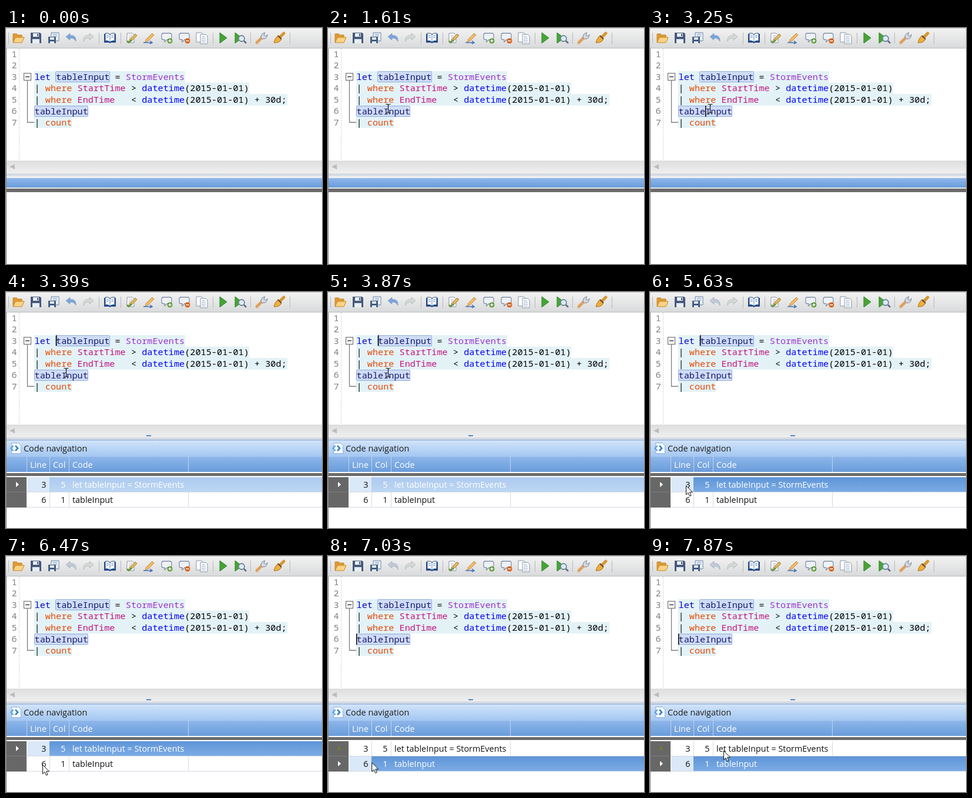
Write an HTML page that moves like this. It is 538 px wide and 404 px high and loops after 8 s.

```html
<!DOCTYPE html>
<html lang="en">
<head>
<meta charset="utf-8">
<title>Code navigation</title>
<style>
html, body { margin: 0; width: 100%; height: 100%; overflow: hidden; background: #fff; }
svg { display: block; width: 538px; height: 404px; }
.code text { font: 15.23px "Noto Sans Mono", monospace; white-space: pre; }
.num { fill: #808080; }
.kw { fill: #0000d0; } .fn { fill: #0000ff; } .id { fill: #191970; }
.op { fill: #e64a0c; } .col { fill: #c4157f; } .tbl { fill: #9a32cd; }
.ui text { font: 14.4px "Open Sans", "Noto Sans", sans-serif; }
.end { text-anchor: end; }
.white { fill: #fff; }

/* 1% of the loop is 80 ms */
.a { animation: 8s step-end infinite; }
.idle { animation-name: idle; }
.results { animation-name: results; }
.caret { fill: #000; }
.caret-a { animation-name: caret-a; }
.caret-b { animation-name: caret-b; }
.caret-c { animation-name: caret-c; }
.undo { animation-name: undo; }
.hover { animation-name: hover; }
.plain { animation-name: plain; }
.focus { animation-name: focus; }
.first { animation-name: first; }
.second { animation-name: second; }
.text1 { animation-name: text1; }
.text2 { animation-name: text2; }
.mark1 { animation-name: mark1; }
.pointer { animation: move 8s linear infinite, enter 8s step-end infinite; }
.arrow { animation-name: arrow; }
.beam { animation-name: beam; }

@keyframes idle { 0% { opacity: 1 } 42.375%, to { opacity: 0 } }
@keyframes results { 0% { opacity: 0 } 42.375%, to { opacity: 1 } }
@keyframes caret-a {
  0%, 20.125%, 33.875%, 42.375%, to { opacity: 0 }
  13.375%, 26.875%, 40.625% { opacity: 1 }
}
@keyframes caret-b {
  0%, 49.375%, 62.875%, 80.125%, to { opacity: 0 }
  42.375%, 56.125%, 69.625% { opacity: 1 }
}
@keyframes caret-c {
  0%, 90.5% { opacity: 0 }
  81.875%, 97.25%, to { opacity: 1 }
}
@keyframes undo { 0% { color: #78a5de } 70.25%, to { color: #c3cad4 } }
@keyframes hover { 0%, 64.625%, to { opacity: 0 } 60.625% { opacity: 1 } }
@keyframes plain { 0%, 64.625%, to { opacity: 1 } 60.625% { opacity: 0 } }
@keyframes focus { 0% { opacity: 0 } 70.25%, to { opacity: 1 } }
@keyframes first { 0% { opacity: 1 } 81.875%, to { opacity: 0 } }
@keyframes second { 0% { opacity: 0 } 81.875%, to { opacity: 1 } }
@keyframes text1 { 0% { fill: #fff } 81.875%, to { fill: #111 } }
@keyframes text2 { 0% { fill: #111 } 81.875%, to { fill: #fff } }
@keyframes mark1 { 0% { fill: #fff } 81.875%, to { fill: #6d8228 } }
@keyframes enter { 0% { opacity: 0 } 1.875%, to { opacity: 1 } }
@keyframes arrow { 0%, 58.75%, to { opacity: 1 } 5.3% { opacity: 0 } }
@keyframes beam { 0%, 58.75%, to { opacity: 0 } 5.3% { opacity: 1 } }
@keyframes move {
  0% { transform: translate(424px, 392px) }
  1.875% { transform: translate(424px, 392px); animation-timing-function: steps(5, start) }
  6.2% { transform: translate(170px, 200px); animation-timing-function: steps(3, start) }
  9% { transform: translate(64px, 110px); animation-timing-function: steps(3, start) }
  11.375% { transform: translate(100px, 137px); animation-timing-function: step-end }
  12.375%, 51.125% { transform: translate(102px, 138px); animation-timing-function: steps(3, start) }
  53.125% { transform: translate(100px, 136px); animation-timing-function: step-end }
  54.875% { transform: translate(100px, 137px); animation-timing-function: steps(9, start) }
  63.625% { transform: translate(61px, 323px); animation-timing-function: step-end }
  64.625% { transform: translate(61px, 330px); animation-timing-function: step-end }
  65.375%, 73% { transform: translate(61px, 331px); animation-timing-function: steps(6, start) }
  79.125% { transform: translate(62px, 354px); animation-timing-function: step-end }
  80.125% { transform: translate(62px, 357px); animation-timing-function: step-end }
  86.875% { transform: translate(62px, 358px); animation-timing-function: steps(10, start) }
  96.25% { transform: translate(123px, 334px); animation-timing-function: step-end }
  97.25%, to { transform: translate(125px, 333px) }
}
</style>
</head>
<body>
<svg viewBox="0 0 538 404">
  <defs>
    <linearGradient id="bar" x2="0" y2="1"><stop stop-color="#f3f3f3"/><stop offset="1" stop-color="#d9dadb"/></linearGradient>
    <linearGradient id="scroll" x2="0" y2="1"><stop stop-color="#dedede"/><stop offset="1" stop-color="#efefef"/></linearGradient>
    <linearGradient id="blue" x2="0" y2="1"><stop stop-color="#8fb7eb"/><stop offset="1" stop-color="#6a9cda"/></linearGradient>
    <linearGradient id="pale" x2="0" y2="1"><stop stop-color="#d4e5fa"/><stop offset="1" stop-color="#a4c7f2"/></linearGradient>
    <linearGradient id="deep" x2="0" y2="1"><stop stop-color="#6c9bd6"/><stop offset="1" stop-color="#4a80c4"/></linearGradient>
    <linearGradient id="selected" x2="0" y2="1"><stop stop-color="#5f95d7"/><stop offset="1" stop-color="#7babe5"/></linearGradient>
    <linearGradient id="unfocused" x2="0" y2="1"><stop stop-color="#adcaee"/><stop offset="1" stop-color="#bdd6f4"/></linearGradient>
    <path id="turn" d="M-9 -2 -2 -8V-4.500C5 -5 9 -1 8 6 6 2 3 0 -2 .5V4Z"/>
    <path id="bubble" d="M-8 -8H5Q8 -8 8 -5V0Q8 3 5 3H0L-4 7V3H-6Q-9 3 -9 0V-5Q-9 -8 -6 -8Z" fill="#eef2f7" stroke="#8093ab" stroke-width="1.300"/>
    <path id="pencil" d="M-7 7-5 2 5 -8 8 -5 -2 5Z"/>
    <path id="sheet" d="M-6 -8H3L6 -5V8H-6Z" fill="#fff" stroke="#8793a5"/>
  </defs>

  <rect width="538" height="404" fill="#fff"/>

  <g id="toolbar">
    <rect width="538" height="34" fill="url(#bar)"/>
    <path d="M0 .5H538" stroke="#c9c9c9"/>
    <path d="M0 34.500H538" stroke="#b9bbbd"/>
    <path d="M4.500 8V27M158.500 8V27M195.500 8V27M352.500 8V27M416.500 8V27M483.500 8V27" stroke="#b5b7ba"/>
    <g transform="translate(21 17)" stroke="#c9851f">
      <path d="M-9 8V-7H-3L-1 -5H6V-1" fill="#dc9a35"/>
      <path d="M-9 8-5 -1H10L6 8Z" fill="#fad385"/>
    </g>
    <g transform="translate(51 17)">
      <path d="M-9 -9H7L9 -7V9H-9Z" fill="#46597a"/>
      <path d="M-5 -8H5V-2H-5ZM-6 2H6V9H-6Z" fill="#e9eef5"/>
      <path d="M2 -7H4V-3H2Z" fill="#46597a"/>
    </g>
    <g transform="translate(81 17)">
      <path d="M-4 -9H9V5H-4Z" fill="#eaf0f8" stroke="#6b83a6"/>
      <path d="M-1 -6H6M-1 -3H6" stroke="#7797c4"/>
      <path d="M-9 -2H4V9H-9Z" fill="#465d84"/>
      <path d="M-6 -1H1V3H-6ZM-6 6H1V9H-6Z" fill="#edf2f8"/>
    </g>
    <g class="a undo" transform="translate(111 17)" color="#78a5de"><use href="#turn" fill="currentColor" stroke="#8a9bb3" stroke-width=".6"/></g>
    <use href="#turn" transform="translate(140 17) scale(-1 1)" fill="#d3d9d5" stroke="#aab3ae" stroke-width=".7"/>
    <g transform="translate(177 17)">
      <path d="M-10 -7H10V8H2L0 9-2 8H-10Z" fill="#234b84"/>
      <path d="M-8 -8Q-3 -9 0 -6Q3 -9 8 -8V5Q3 4 0 7Q-3 4 -8 5Z" fill="#fff" stroke="#234b84"/>
      <path d="M0 -6V7M-6 -4H-2M-6 -1H-2M2 -4H6M2 -1H6" stroke="#5d80b2"/>
    </g>
    <g transform="translate(214 17)">
      <use href="#sheet" x="-2"/>
      <path d="M-5 -4H1M-5 -1H1M-5 2H1" stroke="#a3adba"/>
      <use href="#pencil" x="1" y="1" fill="#e3b65a" stroke="#a08544"/>
      <path d="M-8 5-5 8 0 3" fill="none" stroke="#55973f" stroke-width="2"/>
    </g>
    <g transform="translate(243 17)">
      <use href="#pencil" x="1" fill="#f4bb62" stroke="#c08a3c"/>
      <path d="M-9 8H6M2 5 6 8 2 10" fill="none" stroke="#3d72b8" stroke-width="1.500"/>
    </g>
    <g transform="translate(274 17)">
      <use href="#bubble"/>
      <circle cx="5" cy="5" r="4.500" fill="#5f9d3a"/><path d="M2.500 5H7.500M5 2.500V7.500" stroke="#fff" stroke-width="1.500"/>
    </g>
    <g transform="translate(304 17)">
      <use href="#bubble"/>
      <circle cx="5" cy="5" r="4.500" fill="#d9631e"/><path d="M2.500 5H7.500" stroke="#fff" stroke-width="1.500"/>
    </g>
    <g transform="translate(333 17)">
      <use href="#sheet" x="-3" y="-1"/><use href="#sheet" x="4" y="2"/>
      <path d="M0 -2H6M0 1H7M0 4H7M0 7H7" stroke="#8fa5c4"/>
    </g>
    <path d="M364 8 376 17 364 26Z" fill="#46a535" stroke="#2f8426"/>
    <path d="M390 8 402 17 390 26Z" fill="#46a535" stroke="#2f8426"/>
    <circle cx="401" cy="18" r="5" fill="#dceaf6" stroke="#72849b" stroke-width="1.800"/>
    <path d="M405 22 409 26" stroke="#596a80" stroke-width="2.500"/>
    <g transform="translate(435 17)">
      <path d="M-8 8 1 -1" stroke="#e0a062" stroke-width="5" stroke-linecap="round"/>
      <path d="M-1 -1Q-1 -8 6 -9L4 -5 7 -3 10 -6Q10 2 2 2Z" fill="#d3d8df" stroke="#7d8794"/>
    </g>
    <g transform="translate(465 17)">
      <path d="M1 -1 8 -8" stroke="#d9952f" stroke-width="5" stroke-linecap="round"/>
      <path d="M-2 -4 4 2 2 5Q-2 9 -9 8Q-7 1 -4 -2Z" fill="#f0ad3c" stroke="#a8741f"/>
      <path d="M-2 -4 4 2" stroke="#5b4630" stroke-width="2"/>
    </g>
  </g>

  <g class="code">
    <path d="M22.500 35V227" stroke="#b0b0b0" stroke-dasharray="1 2"/>
    <path d="M48 74H305V93.500H414V113H479V132.500H140V152H112V171H48Z" fill="#e3f2f6"/>
    <g fill="#cfdcf6" stroke="#8facdf">
      <rect x="84.500" y="74.500" width="92" height="18" rx="1"/>
      <rect x="48.500" y="133.500" width="91" height="18" rx="1"/>
    </g>
    <g fill="none" stroke="#7b7b7b" stroke-width="1.300">
      <path d="M36.500 90V161.500H48"/>
      <rect x="30.500" y="77.500" width="12" height="12" fill="#fff"/>
      <path d="M33 83.500H40" stroke="#222"/>
    </g>
    <g class="num">
      <text x="9.500" y="50">1</text><text x="9.500" y="69">2</text><text x="9.500" y="89">3</text>
      <text x="9.500" y="108">4</text><text x="9.500" y="128">5</text><text x="9.500" y="147">6</text><text x="9.500" y="167">7</text>
    </g>
    <text x="48.500" y="89"><tspan class="kw">let</tspan> <tspan class="id">tableInput</tspan> = <tspan class="tbl">StormEvents</tspan></text>
    <text x="48.500" y="108">| <tspan class="op">where</tspan> <tspan class="col">StartTime</tspan> &gt; <tspan class="fn">datetime</tspan>(2015-01-01)</text>
    <text x="48.500" y="128">| <tspan class="op">where</tspan> <tspan class="col">EndTime</tspan>   &lt; <tspan class="fn">datetime</tspan>(2015-01-01) + 30d;</text>
    <text x="48.500" y="148" class="id">tableInput</text>
    <text x="48.500" y="167">| <tspan class="op">count</tspan></text>
    <rect class="a caret caret-a" x="94" y="133" width="1.500" height="19"/>
    <rect class="a caret caret-b" x="85" y="74" width="1.500" height="18"/>
    <rect class="a caret caret-c" x="48" y="133" width="1.500" height="19"/>
  </g>

  <rect y="227" width="538" height="22" fill="url(#scroll)"/>
  <path d="M6 237.500 15 233V242Z" fill="#bcbcbc"/>
  <rect y="249" width="538" height="4" fill="#d3dae3"/>

  <g class="a idle">
    <rect y="253" width="538" height="4" fill="#eceef0"/>
    <rect y="257" width="538" height="16" fill="url(#blue)"/>
    <rect y="273" width="538" height="2" fill="#e6e9ed"/>
    <rect y="275" width="538" height="6" fill="#6b6b6b"/>
  </g>

  <g class="a results ui">
    <rect x="239" y="245" width="8" height="2" fill="#4f8ac9"/>
    <rect y="253" width="538" height="28" fill="url(#pale)"/>
    <path d="M0 253.500H538" stroke="#82a5d3"/>
    <path d="M9.500 258.500H21L25.500 263V276.500H9.500Z" fill="#f7fbff" stroke="#8faed4"/>
    <path d="M12.500 263 8.500 267.500 12.500 272" fill="none" stroke="#5ba3e0" stroke-width="2.500"/>
    <path d="M16 263 20 267.500 16 272" fill="none" stroke="#2879c0" stroke-width="2.500"/>
    <text x="30" y="273" fill="#1e1e1e">Code navigation</text>

    <rect y="281" width="538" height="27" fill="url(#blue)"/>
    <rect class="a hover" x="36" y="281" width="38" height="27" fill="url(#deep)"/>
    <path d="M0 281.500H538" stroke="#a9c8ef"/>
    <path d="M35.500 281V308M74.500 281V308M107.500 281V308M310.500 281V308" stroke="#bcd4f2"/>
    <g class="white">
      <text class="a plain" x="41" y="301">Line</text>
      <g class="a hover">
        <text x="41" y="301">L.</text>
        <path d="M56.500 286.500H65.500L62 290.500V295L60 293.500V290.500Z" fill="none" stroke="#d5e4f7"/>
      </g>
      <text x="80" y="301">Col</text>
      <text x="113" y="301">Code</text>
    </g>
    <rect y="308" width="538" height="9" fill="#fff"/>
    <rect y="310" width="538" height="5" fill="#6b6b6b"/>

    <path d="M35 342.500H538M35 368.500H538" stroke="#d3d9e0"/>
    <path class="a second" d="M74.500 317V342M107.500 317V342M310.500 317V342" stroke="#d3d9e0"/>
    <path class="a first" d="M74.500 343V368M107.500 343V368M310.500 343V368" stroke="#d3d9e0"/>
    <g class="a first">
      <rect x="36" y="317" width="502" height="25" fill="url(#unfocused)"/>
      <rect class="a focus" x="36" y="317" width="502" height="25" fill="url(#selected)"/>
      <rect x="36" y="317" width="38" height="25" fill="#dae8f8"/>
    </g>
    <g class="a second">
      <rect x="36" y="343" width="502" height="25" fill="url(#selected)"/>
      <rect x="36" y="343" width="38" height="25" fill="#dae8f8"/>
    </g>
    <rect y="317" width="35" height="52" fill="#676767"/>
    <path d="M0 342.500H35" stroke="#7c7c7c"/>
    <path class="a mark1" d="M17 325 22 329.500 17 334Z" fill="#fff"/>
    <path class="a second" d="M17 351 22 355.500 17 360Z" fill="#fff"/>

    <g class="end" fill="#111">
      <text x="68.500" y="335">3</text>
      <text x="68.500" y="361">6</text>
    </g>
    <g class="a text1" fill="#fff">
      <text class="end" x="101.500" y="335">5</text>
      <text x="113" y="335">let tableInput = StormEvents</text>
    </g>
    <g class="a text2" fill="#111">
      <text class="end" x="101.500" y="361">1</text>
      <text x="113" y="361">tableInput</text>
    </g>
  </g>

  <path d="M.5 35V404" stroke="#8b8b8b"/>

  <g class="pointer">
    <path class="a arrow" d="M.5 .5V16L4 12.600 6.500 18.400 9 17.300 6.600 11.700H11.500Z" fill="#fff" stroke="#111"/>
    <path class="a beam" d="M-3.500 -7.500H-1L.5 -6.500 2 -7.500H4.500M.5 -7V7M-3.500 7.500H-1L.5 6.500 2 7.500H4.500" fill="none" stroke="#111" stroke-width="1.200"/>
  </g>
</svg>
</body>
</html>
```
